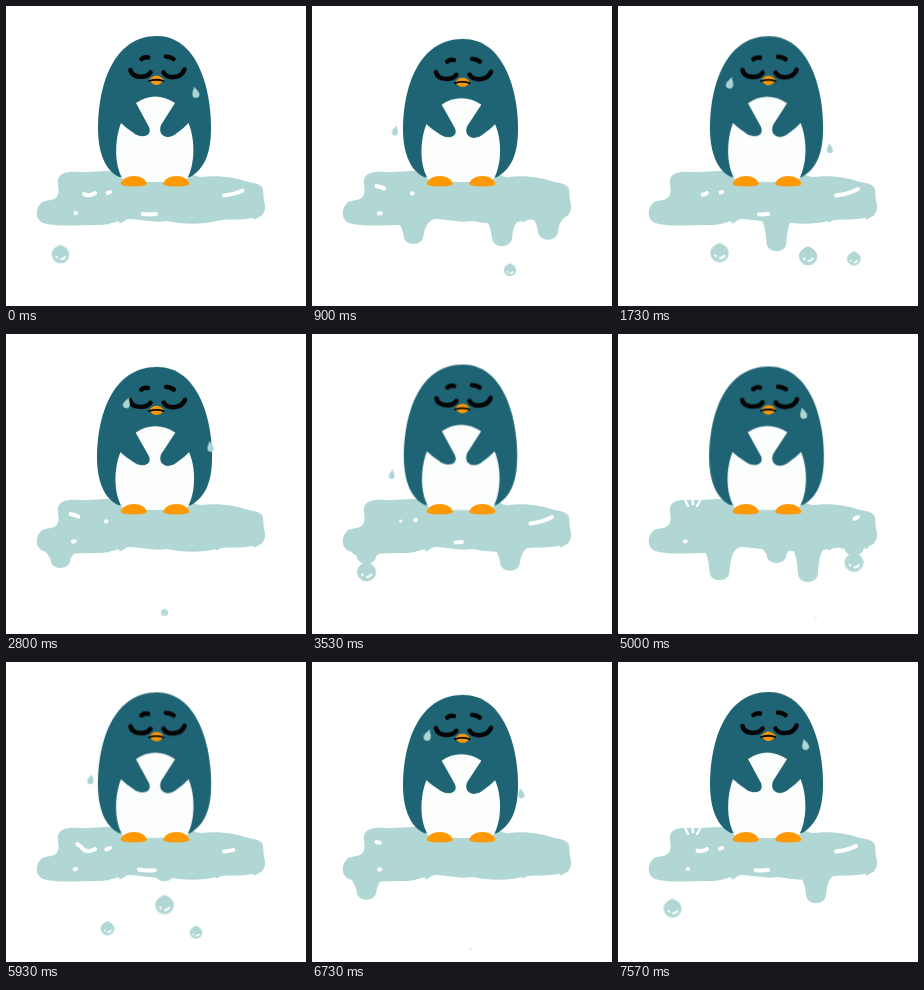
Write an HTML page that moves like this. It is 300x300 px and loops after 7610 ms.

```html
<!DOCTYPE html>
<html lang="en">
<head>
<meta charset="utf-8">
<title>Melting penguin</title>
<style>
  html, body { margin: 0; width: 100%; height: 100%; overflow: hidden; background: #fff; }
  svg { display: block; width: 100vw; height: 100vh; }
  .ice { fill: #b1d7d4; }
  .glint { fill: none; stroke: #fff; stroke-linecap: round; stroke-linejoin: round; }
  .ink { fill: none; stroke: #050506; stroke-width: 4.6; stroke-linecap: round; }
  .mouth { stroke-width: 1.8; }
  .orange { fill: #fe9803; }
  .sweat { fill: #acd5d4; }

  #body {
    transform-origin: 149px 176px;
    animation: breathe 951.25ms cubic-bezier(.37, 0, .63, 1) infinite alternate;
  }
  @keyframes breathe { to { transform: scale(1.018, .98); } }

  .sweat, .splash { animation: 1268.33ms linear infinite; }
  .right { animation-delay: -126.83ms; }
  .left { animation-delay: -1052.71ms; }
  .sweat.right { animation-name: slide-right; }
  .sweat.left { animation-name: slide-left; }
  .splash.right { animation-name: splash-right; }
  .splash.left { animation-name: splash-left; }

  @keyframes slide-right {
    0% { transform: translate(184px, 78px) rotate(-14deg) scale(0); }
    4% { transform: translate(185px, 79px) rotate(-14deg) scale(1); }
    30% { transform: translate(204px, 111px) rotate(-10deg) scale(.95); }
    60% { transform: translate(218px, 168px) rotate(-8deg) scale(.8); }
    60.1%, 100% { transform: translate(218px, 168px) scale(0); }
  }
  @keyframes slide-left {
    0% { transform: translate(122px, 68px) rotate(20deg) scale(0); }
    4% { transform: translate(121px, 69px) rotate(20deg) scale(1); }
    18% { transform: translate(113.5px, 75px) rotate(16deg) scale(1.05); }
    50% { transform: translate(85px, 116px) rotate(10deg) scale(.9); }
    73% { transform: translate(75px, 165px) rotate(8deg) scale(.8); }
    73.1%, 100% { transform: translate(75px, 165px) scale(0); }
  }
  @keyframes splash-right {
    0%, 60% { opacity: 0; }
    60.01%, 69% { opacity: 1; }
    69.01%, 100% { opacity: 0; }
  }
  @keyframes splash-left {
    0%, 73% { opacity: 0; }
    73.01%, 81.9% { opacity: 1; }
    81.91%, 100% { opacity: 0; }
  }
</style>
</head>
<body>
<svg viewBox="0 0 300 300">
  <defs>
    <path id="tear" d="M0-6C1-3 3.5-1 3.5 2A3.5 3.5 0 0 1-3.5 2C-3.5-1-1-3 0-6Z"/>
    <path id="rays" class="glint" stroke-width="2.4" d="M66 163L70 172M74 162L75 170M84 163L79 172"/>
    <g id="drop">
      <path class="ice" d="M0-1.1C.25-1 1-.7 1 0A1 1 0 0 1-1 0C-1-.7-.25-1 0-1.1Z"/>
      <path class="glint" stroke-width=".24" d="M-.46.26L-.4.32M.04.52Q.34.54.5.28"/>
    </g>
  </defs>

  <g id="drips"></g>
  <path class="ice" d="M53 171C58 164 68 166 80 166L100 165L180 166C186 166 188 171 196 171C212 169 228 172 236 174C246 178 256 176 257 184C258 189 257 192 259 198C260 208 255 212 246 212C232 215 222 212 210 215C195 219 175 218 160 215C148 217 138 214 126 213C112 213 108 219 92 219C70 219 50 221 37 217C29 213 29 203 35 197C40 193 50 196 52 188C54 183 50 177 53 171Z"/>
  <g id="glints"></g>
  <use href="#rays" class="splash left"/>
  <g transform="translate(142 6)"><use href="#rays" class="splash right"/></g>

  <g id="body">
    <path fill="#1e6474" d="M151 30C190 30 205 80 205 122C205 148 198 163 184 171L113 171C100 165 92 148 92 122C92 82 106 30 151 30Z"/>
    <path fill="#fcfefe" d="M130 97Q149 84 169 97L155 119C151 130 162 135 171 127Q178 122 182.500 117C190 135 189 163 179 176L119 176C108 163 108 135 115 117Q120 122 127 126.500C134 133 147 131 143 121Z"/>
    <path class="ink" d="M124.500 64C126 72 140 73 144.500 66.500M157.500 66.500C161 73 175 73 178.500 63.500M135.500 53Q139 50.500 142 51.500M160 50.500Q164 50.500 167.500 53"/>
    <path class="orange" d="M143 74Q150.500 65 158 74Q150.500 84 143 74Z"/>
    <path class="ink mouth" d="M143 75Q150.500 72.500 157.500 75"/>
  </g>
  <g class="orange">
    <path id="foot" d="M114.500 177.500Q117.500 170 128 170Q138 170 141 177.500Q141 180.500 128 180.500Q114.500 180.500 114.500 177.500Z"/>
    <use href="#foot" x="42.500"/>
  </g>

  <use href="#tear" class="sweat right"/>
  <use href="#tear" class="sweat left"/>
</svg>

<script>
  const CYCLE = 3805, GROW = 950, RETRACT = 330, FALL = 1110, DEPTH = 53, RADIUS = 9.5;
  const LINGER = 0.37;
  const drips = document.getElementById('drips');
  const glints = document.getElementById('glints');
  const clamp = v => Math.min(1, Math.max(0, v));

  function add(parent, tag, attrs) {
    const el = document.createElementNS('http://www.w3.org/2000/svg', tag);
    for (const name in attrs) el.setAttribute(name, attrs[name]);
    return parent.appendChild(el);
  }

  // Repeats pose(0..1) for ever; phase 0 falls at the time start
  function loop(el, duration, start, pose, steps = 120) {
    const frames = Array.from({ length: steps + 1 }, (_, i) => pose(i / steps));
    el.animate(frames, { duration, delay: start - duration, iterations: Infinity });
  }

  // Tongue of meltwater hanging from the puddle edge
  function tongue(x, edge, length) {
    const neck = edge + length - 9, low = neck + 12;
    return `M${x - 20} ${edge - 4}C${x - 13} ${edge} ${x - 11.5} ${edge + 5} ${x - 10} ${neck}` +
      `C${x - 10} ${low} ${x + 10} ${low} ${x + 10} ${neck}` +
      `C${x + 11.5} ${edge + 5} ${x + 13} ${edge} ${x + 20} ${edge - 4}Z`;
  }

  // A tongue grows by reach, lets a drop go at the release time and retracts
  function drip(x, edge, reach, release) {
    loop(add(drips, 'path', { class: 'ice' }), CYCLE, release, phase => {
      const ms = phase * CYCLE;
      const shrink = clamp(1 - ms / RETRACT);
      const grow = Math.sin(clamp((ms - CYCLE + GROW) / GROW) * Math.PI / 2);
      return { d: `path("${tongue(x, edge, reach * Math.max(shrink, grow))}")` };
    });
    loop(add(drips, 'use', { href: '#drop' }), CYCLE, release, phase => {
      const p = clamp(phase * CYCLE / FALL);
      const y = edge + reach - RADIUS + DEPTH * p ** 1.5;
      return { transform: `translate(${x}px, ${y}px) scale(${RADIUS * (1 - p ** 3)})` };
    });
  }

  drip(236, 213, 21, 1000);
  drip(190, 216, 33, 1350);
  drip(101.5, 217, 31, 1400);
  drip(158.5, 214, 32, 1850);
  drip(54.5, 218, 26, 3350);
  drip(198, 216, 26, 3920);

  // A light runs along the stroke: its head enters, its tail follows after LINGER
  function glint(d, enter, sweep) {
    const el = add(glints, 'path', { class: 'glint', d, pathLength: 100 });
    loop(el, CYCLE / 2, enter * CYCLE / 2, phase => {
      const head = 100 * clamp(phase / sweep);
      const tail = 100 * clamp((phase - LINGER) / sweep);
      return {
        strokeDasharray: `${head - tail} 300`,
        strokeDashoffset: -tail,
        strokeWidth: head > tail ? 4 : 0
      };
    });
  }

  glint('M240 183Q231 188 218 189.500', 0.58, 0.28);
  glint('M150 208Q141 209 133 207.500', 0.72, 0.36);
  glint('M89 187C84 190 79 190 76 186S69 181 64.500 180', 0.85, 0.36);
  glint('M104 186L100 187.500', 0.8, 0.34);
  glint('M70 207L67 207.500', 0.94, 0.42);
</script>
</body>
</html>
```
